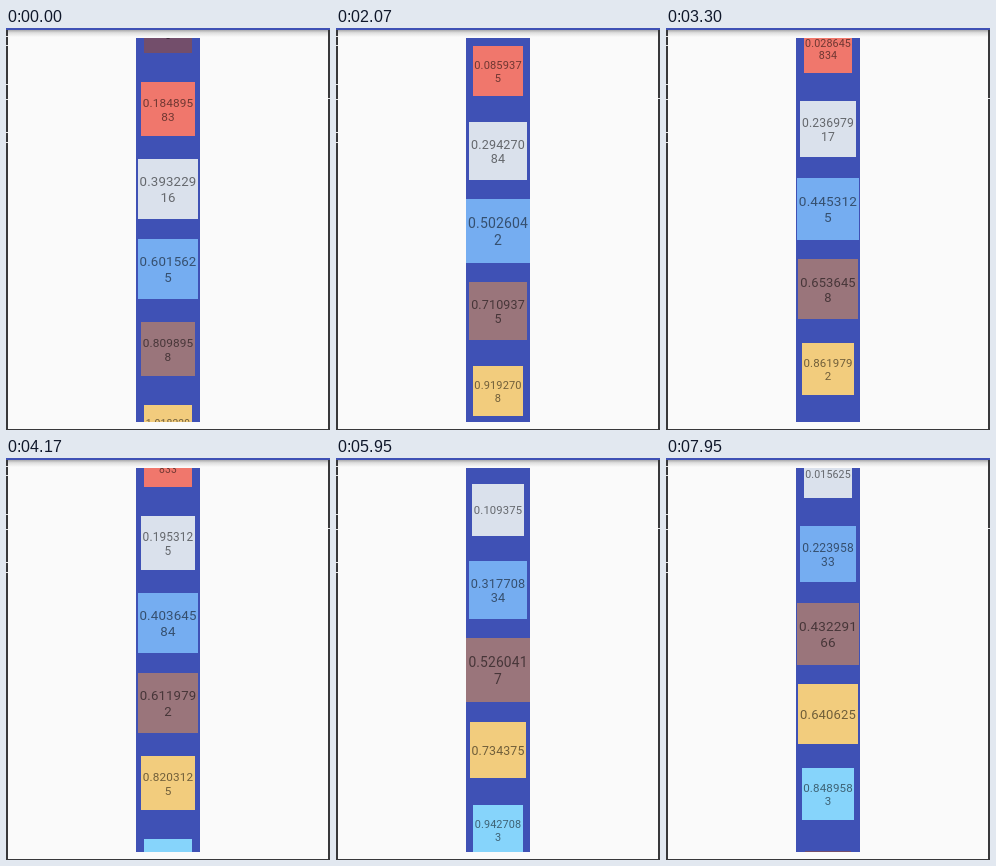
Recreate the animation shown at these times as an HTML page with a canvas. Size 324x402 px, loop 8 s.

```html
<!DOCTYPE html>
<html lang="en">
<head>
<meta charset="utf-8">
<title>Scaling list</title>
<style>
  html, body { margin: 0; width: 100%; height: 100%; overflow: hidden; background: #fafafa; }
  canvas { display: block; }
</style>
</head>
<body>
<canvas id="stage" width="324" height="402"></canvas>
<script>
const ctx = document.getElementById('stage').getContext('2d');
const LOOP = 8000;
const STRIP = { x: 130, y: 10, w: 64, h: 384 };
const SPACING = 80;
const START = -9;            // centre of the first item, relative to the strip
const SPEED = 145 / 7950;    // px per ms
const COLORS = ['#734e6b', '#f0776c', '#dae1ec', '#75adf1', '#9a757b', '#f2cc7d', '#86d4fb'];

function rect(color, x, y, w, h) {
  ctx.fillStyle = color;
  ctx.fillRect(x, y, w, h);
}

// Shortest decimal that identifies a single-precision value
function floatText(value) {
  const single = Math.fround(value);
  if (Number.isInteger(single)) return single.toFixed(1);
  for (let digits = 1; ; digits++) {
    const short = Number(single.toPrecision(digits));
    if (Math.fround(short) === single) return String(short);
  }
}

function drawLabel(text) {
  const fit = text[0] === '-' ? 9 : 8;
  const lines = text.length > fit ? [text.slice(0, fit), text.slice(fit)] : [text];
  const baseline = lines.length > 1 ? -2.7 : 5.5;
  ctx.fillStyle = 'rgba(0, 0, 0, 0.54)';
  lines.forEach((line, i) => ctx.fillText(line, 0, baseline + i * 16.4));
}

function drawItem(index, scrolled) {
  const center = START + index * SPACING - scrolled;
  const position = center / STRIP.h;
  const scale = 1 - Math.abs(position - 0.5) / 2;
  const half = Math.round(STRIP.w / 2 * scale);
  ctx.save();
  ctx.translate(STRIP.x + STRIP.w / 2, STRIP.y + center);
  rect(COLORS[index % COLORS.length], -half, -half, 2 * half, 2 * half);
  ctx.scale(scale, scale);
  drawLabel(floatText(position));
  ctx.restore();
}

function drawWindow() {
  rect('#fafafa', 0, 0, 324, 402);
  const shadow = ctx.createLinearGradient(0, 2, 0, 9);
  shadow.addColorStop(0, '#a9a9ab');
  shadow.addColorStop(0.4, '#dedede');
  shadow.addColorStop(1, '#fafafa');
  rect(shadow, 0, 2, 324, 7);
  rect('#3f51b5', 0, 0, 324, 2);
  rect('#38383a', 0, 2, 2, 400);
  rect('#38383a', 322, 2, 2, 400);
  rect('#38383a', 0, 401, 324, 1);
  for (const y of [8, 17, 56, 71, 104, 114]) rect('#e4e4e4', 0, y, 2, 1);
  rect('#e4e4e4', 322, 70, 2, 1);
}

function draw(time) {
  const scrolled = Math.round(time * SPEED);
  drawWindow();
  ctx.save();
  ctx.beginPath();
  ctx.rect(STRIP.x, STRIP.y, STRIP.w, STRIP.h);
  ctx.clip();
  rect('#3f51b5', STRIP.x, STRIP.y, STRIP.w, STRIP.h);
  ctx.font = '14px Roboto, sans-serif';
  ctx.letterSpacing = '0.15px';
  ctx.textAlign = 'center';
  for (let index = 0; index < 8; index++) drawItem(index, scrolled);
  ctx.restore();
}

const began = performance.now();
function tick() {
  draw((performance.now() - began) % LOOP);
  requestAnimationFrame(tick);
}
tick();
</script>
</body>
</html>
```
